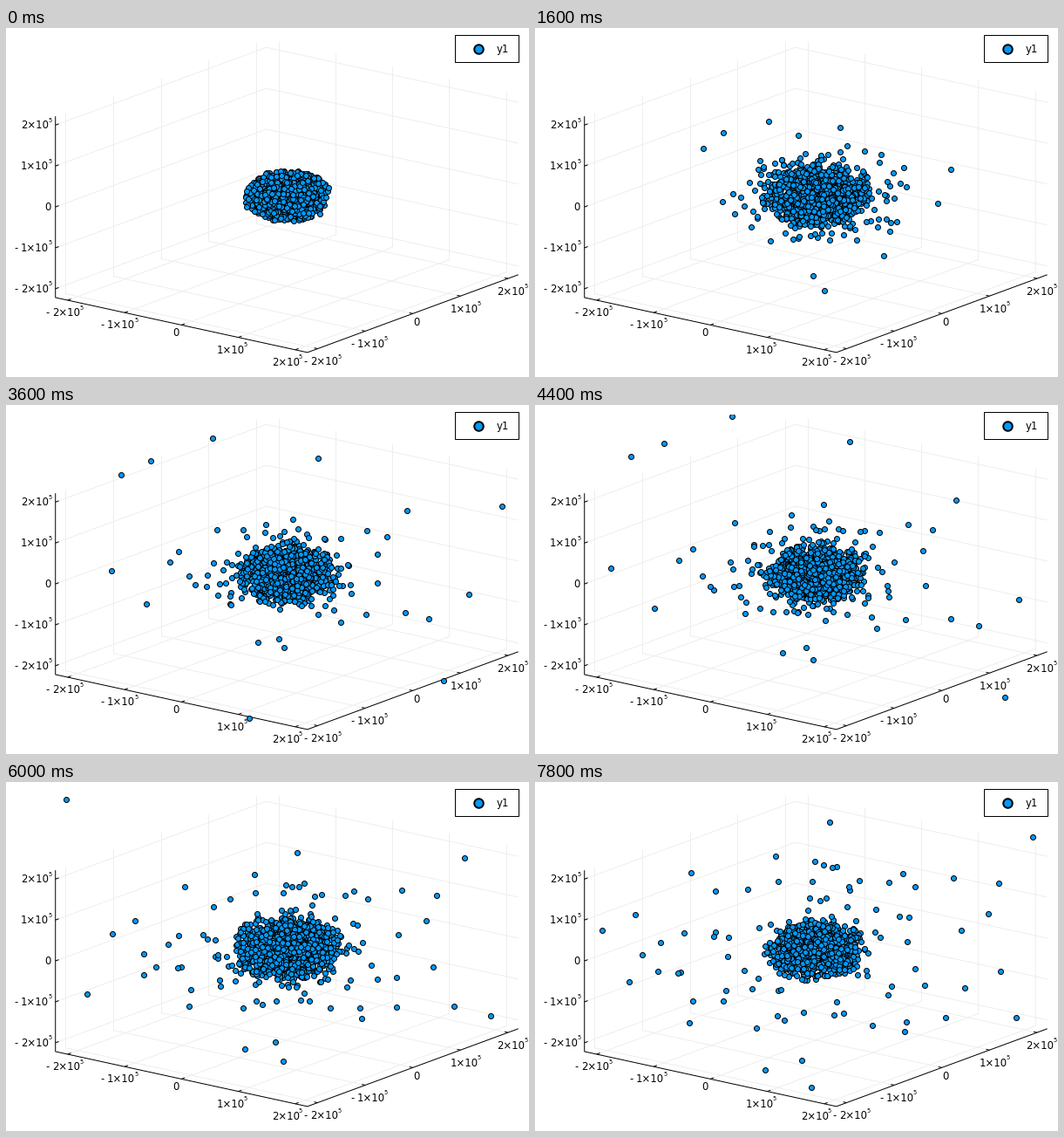
A matplotlib script for the animation above (8000 ms loop, 600 by 400 pixels).

```python
import numpy as np
import matplotlib.pyplot as plt
from matplotlib.animation import FuncAnimation
from matplotlib.patches import Rectangle

FRAMES, STEP = 40, 200
BLUE = "#009afa"
PX = 0.72                       # points per pixel at 100 dpi
CENTRE = np.array([322.2, 192.0])
AXES = np.array([[65.25, 14.2], [54.6, -20.1], [0, -46.9]])
L = 2.215                       # half side of the box, in 1e5 units
CORE = 0.57                     # starting radius of the cluster
N_CORE, N_HALO, N_FREE = 1000, 210, 85
rng = np.random.default_rng(7)


def project(p):
    return CENTRE + np.asarray(p) @ AXES


def pace(t):
    """Escaping bodies slow down gently: distance is linear in this."""
    return t ** 0.75


def directions(n):
    v = rng.normal(size=(n, 3))
    return v / np.linalg.norm(v, axis=1, keepdims=True)


def ball(n):
    return directions(n) * rng.random((n, 1)) ** (1 / 3)


# Bound bodies: the core swings inside the cluster, the halo overshoots it.
core_a, core_b = ball(N_CORE), ball(N_CORE)
core_w = rng.uniform(0.9, 2.0, (N_CORE, 1))
halo_a = ball(N_HALO)
halo_b = directions(N_HALO) * (1.2 + 1.3 * rng.random((N_HALO, 1)) ** 1.7)
halo_w = rng.uniform(0.7, 1.3, (N_HALO, 1))

# Free bodies leave one after another, each along its own ray.
free_dir = directions(N_FREE)
free_v = rng.uniform(0.2, 0.9, (N_FREE, 1))
free_start = rng.uniform(0, 2.2, (N_FREE, 1))

# The first burst: x, y at 1.6 s and x, y at 4.4 s.
BURST = np.array([
    (193, 138, 110, 59), (216, 120, 148, 44), (268, 107, 226, 13),
    (350, 114, 361, 42), (215, 199, 87, 187), (319, 284, 265, 386),
    (332, 301, 383, 419), (477, 162, 602, 100), (400, 261, 539, 335),
    (462, 201, 555, 223),
], float)
burst_v = (BURST[:, 2:] - BURST[:, :2]) / (pace(4.4) - pace(1.6))
burst_p = BURST[:, :2] - burst_v * pace(1.6)


def swing(a, b, w, t):
    return CORE * (a * np.cos(w * t) + b * np.sin(w * t))


def positions(t):
    u = pace(t)
    breath = 0.12 + 0.08 * np.cos(2 * np.pi * (t - 2.3) / 3.6)
    core = swing(core_a, core_b, core_w, t) * (1 + min(t, 1) * breath)
    halo = swing(halo_a, halo_b, halo_w, t) * (1 - 0.045 * t)
    free = free_dir * (0.3 + free_v * np.maximum(u - free_start, 0))
    off = np.concatenate([project(core), project(halo), project(free),
                          burst_p + burst_v * u]) - CENTRE
    # Nothing may leave the cluster faster than the first burst.
    reach = np.hypot(off[:, 0] / 50, off[:, 1] / 32)
    off *= np.minimum(1, (1 + 2 * u) / np.maximum(reach, 1e-6))[:, None]
    return CENTRE + off


fig = plt.figure(figsize=(6, 4), dpi=100, facecolor="white")
ax = fig.add_axes([0, 0, 1, 1])
ax.set(xlim=(0, 600), ylim=(400, 0))
ax.axis("off")


def path(points, color="black", z=2):
    x, y = project(points).T
    ax.plot(x, y, color=color, lw=PX, zorder=z, solid_capstyle="butt")


def write(x, y, s, size=8.4, ha="left"):
    ax.text(x, y, s, fontsize=size, family="DejaVu Sans", ha=ha,
            va="center", zorder=6)


def tick_label(x, y, k, zero_shift):
    """Write k times 1e5 with its exponent starting at x."""
    if k == 0:
        write(x + zero_shift, y, "0")
        return
    write(x + 1, y, f"{abs(k)}×10", ha="right")
    write(x, y - 6, "5", 4.8)
    if k < 0:
        write(x - 38.5, y, "-")


for k in range(-2, 3):
    for grid in ([(-L, k, -L), (-L, k, L)], [(k, L, -L), (k, L, L)],
                 [(-L, k, -L), (L, k, -L)], [(k, -L, -L), (k, L, -L)],
                 [(-L, -L, k), (-L, L, k), (L, L, k)]):
        path(grid, "#eeeeee", 1)
    path([(-L, -L, k), (-L, -L + 0.07, k)])
    path([(k, -L, -L), (k, -L + 0.07, -L)])
    path([(L, k, -L), (L - 0.06, k, -L)])

    drop = 15 if k else 10
    x_tick, y_tick = project([(k, -L, -L), (L, k, -L)])
    tick_label(210 + 62.9 * k, x_tick[1] + drop - 0.5, k, -19)
    tick_label(487 + 53.5 * k, y_tick[1] + drop, k, -20)
    tick_label(48, 205.5 - 46.9 * k, k, -4)
path([(-L, -L, L), (-L, -L, -L), (L, -L, -L), (L, L, -L)])

stars = ax.scatter(*positions(0).T, s=(6 * PX) ** 2, c=BLUE,
                   edgecolors="black", linewidths=PX, zorder=4)
stars.set_clip_path(Rectangle((57, 11), 531, 361, transform=ax.transData))

ax.add_patch(Rectangle((514.9, 8.3), 73, 30.2, fc="white", ec="black",
                       lw=PX, zorder=5))
ax.scatter([542], [24], s=(10.5 * PX) ** 2, c=BLUE, edgecolors="black",
           linewidths=2 * PX, zorder=6)
write(563, 24.5, "y1")


def update(i):
    stars.set_offsets(positions(i * STEP / 1000))
    return (stars,)


anim = FuncAnimation(fig, update, frames=FRAMES, interval=STEP,
                     repeat=True, repeat_delay=0, blit=False)
plt.show()
```
